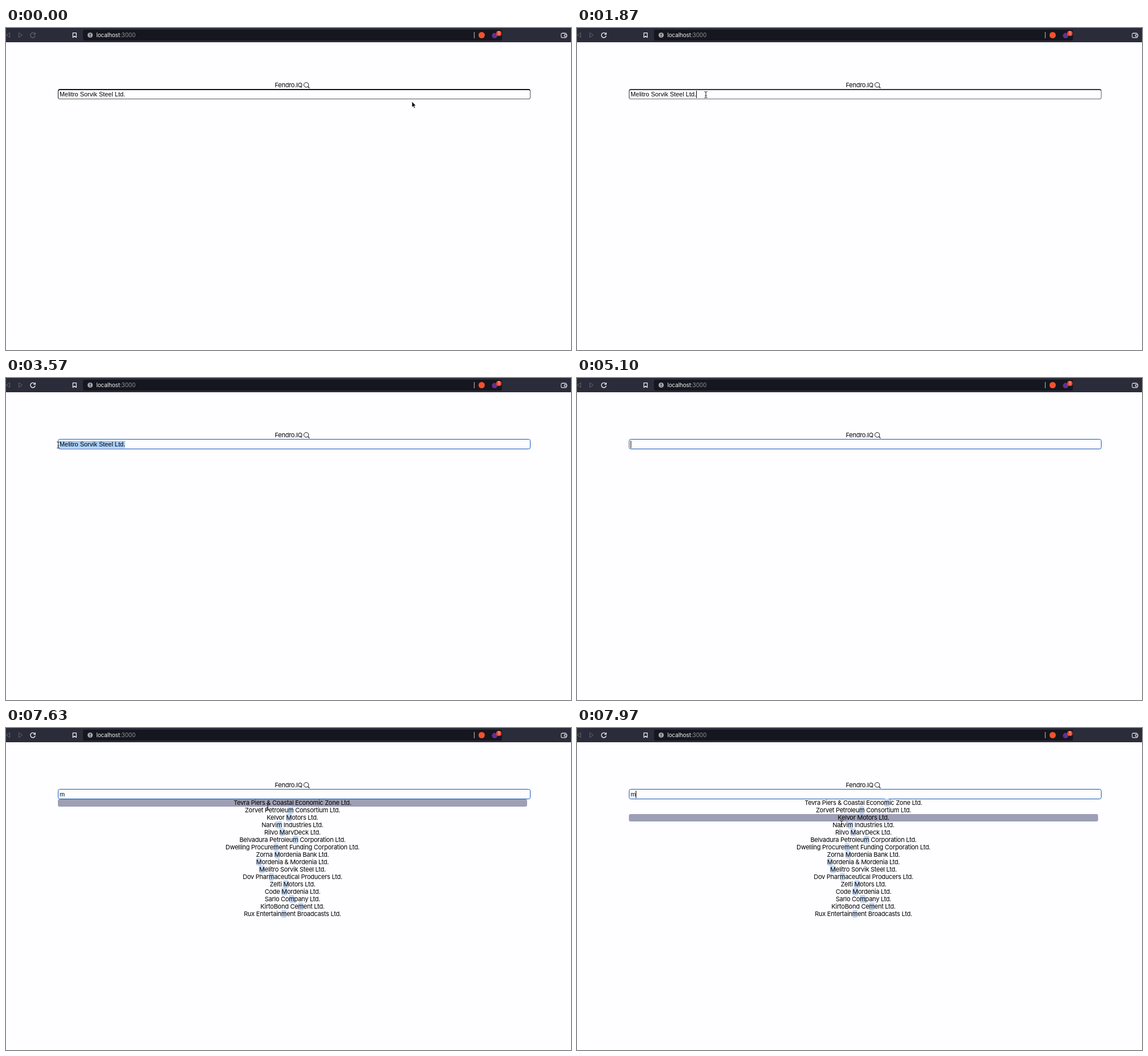
Animation, 991 px wide and 565 px high, one loop 8 s. Source, as an HTML page:

```html
<!DOCTYPE html>
<html lang="en">
<head>
<meta charset="utf-8">
<title>Search box</title>
<style>
  html, body { margin: 0; width: 100%; height: 100%; overflow: hidden; background: #fefdff; }
  body { position: relative; color: #000; font: 11px/13px Inter, sans-serif; letter-spacing: -.26px; white-space: pre; }
  body > * { position: absolute; }
  svg { left: 0; top: 0; }
  #bar { left: 0; top: 0; width: 991px; height: 25px; background: #2b2c39; }
  #address { left: 135px; top: 3px; width: 735px; height: 19px; border-radius: 3px; background: #15161e; }
  #url { left: 158.5px; top: 6px; font-size: 10px; letter-spacing: -.15px; color: #f4f4f6; }
  #url span { color: #92939b; }
  #title { left: 471.5px; top: 94px; }
  .ring { box-sizing: border-box; left: 91px; top: 107px; width: 828.5px; height: 18px; border-radius: 3.5px; }
  #idle { border: solid #111; border-width: 2px 1px 1px 1.5px; border-bottom-color: #555; border-right-color: #555; }
  #focus { border: 1.8px solid #0f55b5; }
  #selection { top: 110px; height: 13px; background: #a9cffb; }
  #value { left: 94px; top: 110px; font: 10.9px/13px "Liberation Sans", Arial, sans-serif; letter-spacing: 0; }
  #caret { top: 110px; width: 1px; height: 13px; background: #000; }
  #list { left: 91px; top: 125px; width: 823px; text-align: center; }
  #list div { height: 13px; border-radius: 3px; }
  mark { color: inherit; background: #c9dcf6; border-radius: 3px; }
  #list .on { background: #9d9fb6; }
  .on mark { background: none; }
</style>
</head>
<body>
<div id="bar"></div>
<div id="address"></div>
<div id="url">localhost<span>:3000</span></div>
<div id="title">Fendro.IQ</div>
<div id="idle" class="ring"></div>
<div id="focus" class="ring"></div>
<div id="selection"></div>
<div id="value"></div>
<div id="caret"></div>
<div id="list"></div>
<svg width="991" height="565" fill="none">
  <g stroke="#62636d" stroke-linejoin="round">
    <path d="M6.5 8.3V16.5L.5 12.4ZM22.5 8.3V16.5L28.5 12.4Z"/>
  </g>
  <g id="reload" stroke-width="1.3">
    <path d="M50.6 10.3A4.2 4.2 0 1 0 51.2 13.4"/>
    <path d="M51.3 8V11.2H48.1" />
  </g>
  <path d="M117.3 8.7H123.3V16.6L120.3 14.2L117.3 16.6Z" stroke="#f1f1f4" stroke-width="1.2" stroke-linejoin="round"/>
  <circle cx="147.6" cy="12.5" r="4.6" fill="#a1a2aa"/>
  <path d="M147.6 9.8V13.2M147.6 14.2V15.4" stroke="#15161e" stroke-width="1.2"/>
  <path d="M821.3 7V18" stroke="#c5c5cb"/>
  <circle cx="834.3" cy="12.5" r="5.5" fill="#f4512c"/>
  <circle cx="857" cy="13.3" r="4.8" fill="#66308f"/>
  <rect x="860" y="5" width="9" height="9" rx="4" fill="#ee4a33"/>
  <text x="864.5" y="12" font-size="7" text-anchor="middle" letter-spacing="0" fill="#fff">1</text>
  <g stroke="#e9e9ed" stroke-width="1.1">
    <rect x="973.8" y="9.3" width="9.2" height="7.6" rx="1.5"/>
    <path d="M975 9.2H981.5"/>
    <rect x="979.3" y="11.6" width="4.6" height="3.2" rx="1" fill="#2b2c39"/>
  </g>
  <g stroke="#111" stroke-width="1">
    <circle cx="526.6" cy="99.8" r="4.2"/>
    <path d="M529.6 102.8L532.3 105.6" stroke-width="1.3"/>
  </g>
  <path id="arrow" d="M0 0V10.2L2.3 8.1L3.9 11.8L5.6 11.1L4 7.5H7.1Z" fill="#000" stroke="#fff" stroke-width=".7"/>
  <g id="beam">
    <path d="M-2.6-5.5Q0-5.5 0-4V4Q0 5.5-2.6 5.5M2.6-5.5Q0-5.5 0-4M0 4Q0 5.5 2.6 5.5M-1.3 1.5H1.3" stroke="#222"/>
  </g>
</svg>
<script>
const $ = id => document.getElementById(id);
const show = (el, on) => { el.style.visibility = on ? 'visible' : 'hidden'; };
const LOOP = 8000, LEFT = 94;
const QUERY = 'Melitro Sorvik Steel Ltd.';
const NAMES = [
  'Tevra Piers & Coastal Economic Zone', 'Zorvet Petroleum Consortium', 'Kelvor Motors',
  'Narvim Industries', 'Rilvo MarvDeck', 'Belvadura Petroleum Corporation',
  'Dwelling Procurement Funding Corporation', 'Zorna Mordenia Bank', 'Mordenia & Mordenia',
  'Melitro Sorvik Steel', 'Dov Pharmaceutical Producers', 'Zelti Motors', 'Code Mordenia',
  'Sarlo Company', 'KirtoBond Cement', 'Rux Entertainment Broadcasts'
];
// Pointer path: time, x, y
const PATH = [
  [400, 712, 129], [500, 664, 127], [620, 480, 107], [740, 270, 104], [840, 165, 102], [920, 137, 102],
  [1070, 188, 103], [1270, 188, 103], [1400, 200, 108], [1580, 220, 121], [1730, 226, 117],
  [2300, 226, 117], [2430, 211, 117], [2630, 211, 117], [2710, 190, 116.5], [2770, 173, 116.5],
  [2900, 140, 116], [3100, 108, 116], [3270, 94, 117], [3400, 89.5, 117], [3470, 89.5, 117],
  [3560, 92, 117.5], [3670, 89.5, 117.5], [6730, 89.5, 117.5], [6800, 104, 105], [6870, 123, 102],
  [7000, 180, 95], [7150, 270, 96], [7300, 370, 110], [7420, 432, 129], [7530, 459, 138],
  [7630, 459, 138], [7740, 461, 146], [7860, 463, 158], [7970, 464, 168]
];

$('list').innerHTML = NAMES.map(n => `<div>${n.replace(/m/i, '<mark>$&</mark>')} Ltd.</div>`).join('');
const rows = [...$('list').children];

const pen = document.createElement('canvas').getContext('2d');
pen.font = '10.9px "Liberation Sans", Arial, sans-serif';
const edge = n => LEFT + pen.measureText(QUERY.slice(0, n)).width;
const edges = [...QUERY, ''].map((_, i) => edge(i));
const END = edges[QUERY.length];

function pointer(t) {
  const i = PATH.findIndex(p => p[0] > t);
  if (i < 0) return PATH[PATH.length - 1].slice(1);
  if (!i) return PATH[0].slice(1);
  const [t0, x0, y0] = PATH[i - 1], [t1, x1, y1] = PATH[i];
  const k = (t - t0) / (t1 - t0);
  return [x0 + (x1 - x0) * k, y0 + (y1 - y0) * k];
}

function caretOn(t) {
  if (t < 4000) return t >= 1870 && t < 2370;
  if (t < 5800) return t < 4600 || t >= 5100 && t < 5600;
  return Math.floor((t - 5800) / 500) % 2 === 0;
}

function draw(t) {
  const listed = t >= 5800, cleared = t >= 4000;
  const text = listed ? 'm' : cleared ? '' : QUERY;
  $('value').textContent = text;

  $('reload').setAttribute('stroke', t < 1700 ? '#62636d' : '#f4f4f6');
  const focus = Math.min(1, Math.max(0, (t - 1850) / 150));
  $('focus').style.opacity = focus;
  $('idle').style.opacity = 1 - focus;

  $('caret').style.left = LEFT + pen.measureText(text).width + 'px';
  show($('caret'), caretOn(t));

  // The selection trails the pointer and snaps to letters
  const dragX = pointer(t - 60)[0];
  const start = t >= 3400 ? LEFT
    : edges.reduce((a, b) => Math.abs(b - dragX) < Math.abs(a - dragX) ? b : a);
  show($('selection'), t >= 2630 && !cleared);
  $('selection').style.left = start + 'px';
  $('selection').style.width = END - start + 'px';

  show($('list'), listed);
  const active = t < 7740 ? 0 : t < 7870 ? 1 : 2;
  rows.forEach((row, i) => row.classList.toggle('on', i === active));

  const [x, y] = pointer(t);
  const visible = !cleared || t >= 6730;
  const beam = y > 108 && y < 125 && x < 919 || listed && y >= 125 && x > 397;
  for (const id of ['arrow', 'beam']) {
    $(id).setAttribute('transform', `translate(${x} ${y})`);
    show($(id), visible && beam === (id === 'beam'));
  }
}

function tick() {
  draw(performance.now() % LOOP);
  requestAnimationFrame(tick);
}
tick();
</script>
</body>
</html>
```
